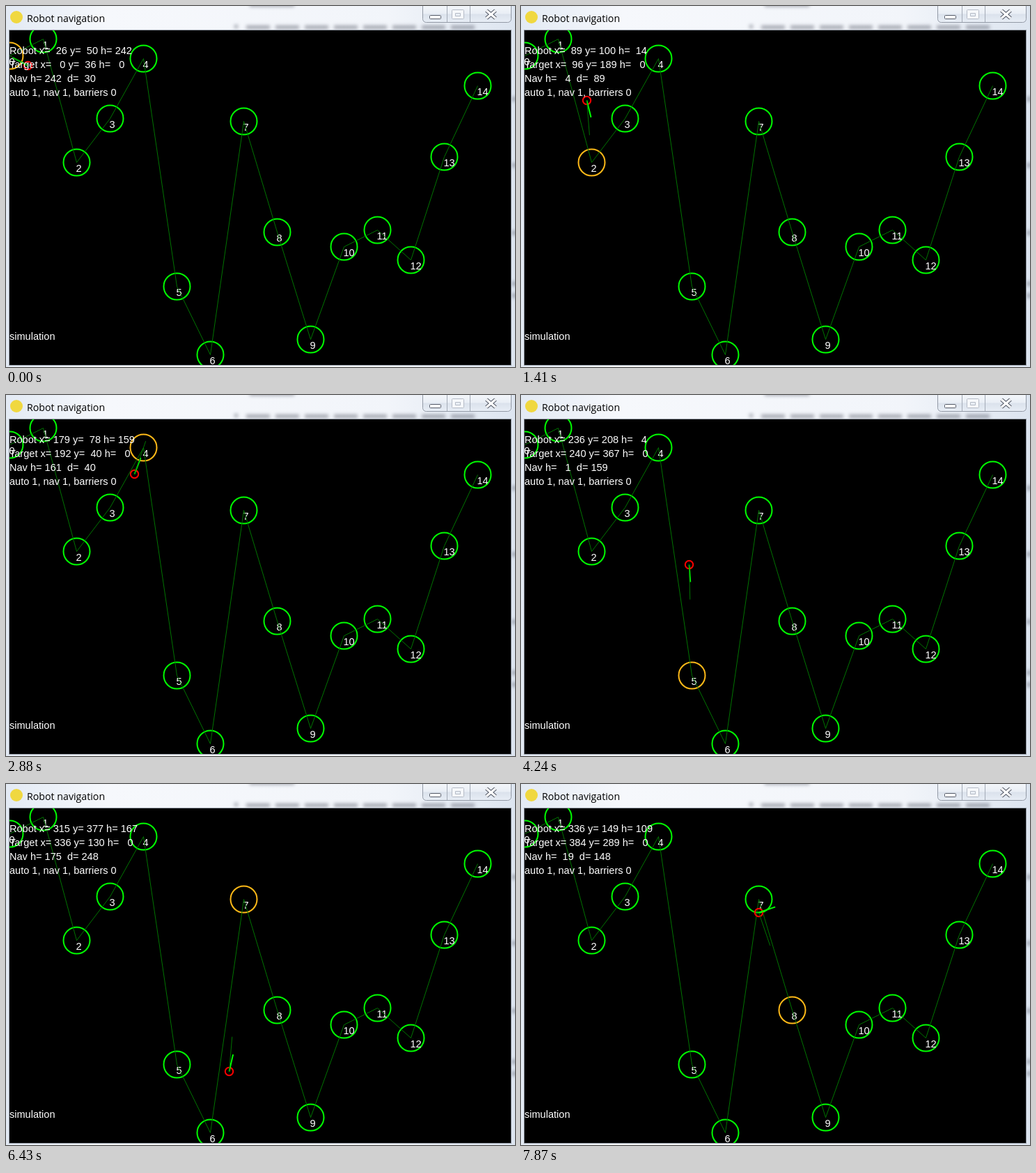
These frames come from a looping animation (731 by 518 pixels, 8 s). An HTML page with a canvas:

```html
<!DOCTYPE html>
<html lang="en">
<head>
<meta charset="utf-8">
<title>Robot navigation</title>
<style>
  html, body { margin: 0; width: 100%; height: 100%; overflow: hidden; background: #e6ecf5; }
  canvas { display: block; }
</style>
</head>
<body>
<canvas id="stage" width="731" height="518"></canvas>
<script>
const ctx = document.getElementById('stage').getContext('2d');
const LOOP = 8000;
const FIELD = { x: 5, y: 35, w: 720, h: 480 };
const GREEN = '#00ff00', DARK_GREEN = '#007400', ORANGE = '#ffba18', RED = '#ff0000';

// Waypoints are 48 units apart; only their heights vary.
const waypoints = [36, 12, 189, 126, 40, 367, 465, 130, 289, 443, 310, 286, 329, 181, 79]
  .map((y, i) => ({ x: i * 48, y }));

// Runs of evenly spaced steps: first time, last time, count.
const runs = [[0, 0, 1], [120, 1140, 8], [1260, 2280, 8], [2440, 3480, 8], [3640, 4660, 8],
  [4810, 5820, 8], [5970, 6880, 7], [7040, 7870, 7]];
const stepTimes = runs.flatMap(([from, to, n]) => Array.from({ length: n },
  (_, i) => Math.floor((from + (n > 1 ? (to - from) * i / (n - 1) : 0)) / 10) * 10));

// Known poses: step, x, y, heading, target.
const keyPoses = [[0, 26, 50, 242, 0], [10, 89, 100, 14, 2], [20, 179, 78, 159, 4],
  [29, 236, 208, 4, 5], [37, 257, 419, 24, 6], [44, 315, 377, 167, 7], [54, 336, 149, 109, 8]]
  .map(([step, x, y, h, target]) => ({ step, x, y, h, target }));

const rad = degrees => degrees * Math.PI / 180;
const turn = (from, to) => ((to - from + 540) % 360 + 360) % 360 - 180;
const wrap = degrees => (Math.round(degrees) % 360 + 360) % 360;

function navigate({ x, y, target }) {
  const dx = waypoints[target].x - x, dy = waypoints[target].y - y;
  return { h: Math.atan2(dx, dy) * 180 / Math.PI, d: Math.hypot(dx, dy) };
}

// Proportional steering; the robot slows down while it faces away from its target.
function drive(pose) {
  const SPEED = 26.8, GAIN = 0.5, REACHED = 20, SUBSTEPS = 20;
  const p = { ...pose };
  for (let i = 0; i < SUBSTEPS; i++) {
    if (navigate(p).d < REACHED) p.target++;
    const error = turn(p.h, navigate(p).h);
    const v = SPEED / SUBSTEPS * Math.max(0, Math.cos(rad(error)));
    p.x += v * Math.sin(rad(p.h));
    p.y += v * Math.cos(rad(p.h));
    p.h += GAIN / SUBSTEPS * error;
  }
  return p;
}

// Simulate between key poses and spread the remaining drift evenly.
const poses = [];
keyPoses.forEach((start, k) => {
  const end = keyPoses[k + 1];
  if (!end) return poses.push(start);
  const count = end.step - start.step, track = [start];
  for (let i = 0; i < count; i++) track.push(drive(track[i]));
  const last = track[count];
  for (let i = 0; i < count; i++) {
    const p = track[i], part = i / count;
    poses.push({
      x: p.x + (end.x - last.x) * part,
      y: p.y + (end.y - last.y) * part,
      h: p.h + turn(last.h, end.h) * part,
      target: Math.min(p.target, end.target)
    });
  }
});

function ring(x, y, r, color) {
  ctx.strokeStyle = color;
  ctx.lineWidth = 2;
  ctx.beginPath();
  ctx.arc(x, y, r, 0, Math.PI * 2);
  ctx.stroke();
}

function line(points, color, width) {
  ctx.strokeStyle = color;
  ctx.lineWidth = width;
  ctx.beginPath();
  points.forEach(([x, y]) => ctx.lineTo(x, y));
  ctx.stroke();
}

function ray(x, y, heading, length, color, width) {
  const a = rad(heading);
  line([[x, y], [x + length * Math.sin(a), y + length * Math.cos(a)]], color, width);
}

function text(s, x, y) {
  ctx.fillStyle = '#fff';
  ctx.font = '14.55px "Liberation Sans", sans-serif';
  ctx.fillText(s, x, y);
}

function box(x, y, w, h, fill, stroke, radii = 0) {
  ctx.beginPath();
  ctx.roundRect(x, y, w, h, radii);
  ctx.fillStyle = fill;
  ctx.fill();
  ctx.strokeStyle = stroke;
  ctx.lineWidth = 1;
  ctx.stroke();
}

function drawWindow() {
  const glass = ctx.createLinearGradient(0, 0, 731, 0);
  glass.addColorStop(0, '#e3eaf4');
  glass.addColorStop(0.2, '#f6f8fc');
  glass.addColorStop(0.75, '#f2f5fa');
  glass.addColorStop(1, '#dde5f0');
  ctx.fillStyle = glass;
  ctx.fillRect(0, 0, 731, 518);

  // Blurred page behind the glass frame
  ctx.save();
  ctx.filter = 'blur(2.5px)';
  ctx.fillStyle = 'rgba(60, 65, 80, 0.45)';
  ctx.fillRect(350, -3, 64, 4);
  ctx.fillRect(328, 27, 5, 5);
  for (let x = 345; x < 640; x += 42) ctx.fillRect(x, 28, 34, 5);
  for (const y of [130, 225, 322, 395, 412]) ctx.fillRect(727, y, 5, 7);
  ctx.restore();

  ctx.fillStyle = '#f0d840';
  ctx.beginPath();
  ctx.arc(15, 16, 9, 0, Math.PI * 2);
  ctx.fill();
  ctx.fillStyle = '#000';
  ctx.font = '14.2px "Open Sans", sans-serif';
  ctx.fillText('Robot navigation', 30, 23);

  const button = ctx.createLinearGradient(0, 0, 0, 24);
  button.addColorStop(0, '#f3f6fa');
  button.addColorStop(0.45, '#e9eef5');
  button.addColorStop(0.5, '#dbe2ec');
  button.addColorStop(1, '#e8eef6');
  box(598.5, -2.5, 127, 26, button, '#9299a5', [0, 0, 5, 5]);
  line([[633.5, 0], [633.5, 23]], '#a4abb7', 1);
  line([[666.5, 0], [666.5, 23]], '#a4abb7', 1);
  box(608.5, 13.5, 16, 5, '#fff', '#555b68', 1);
  box(640.5, 5.5, 17, 13, '#f6f8fb', '#b5bbc6', 1);
  box(645.5, 10.5, 7, 4, '#e9eef5', '#b5bbc6');
  for (const [color, width] of [['#555b68', 5.5], ['#fff', 3.2]]) {
    line([[690, 6.5], [703, 17.5]], color, width);
    line([[703, 6.5], [690, 17.5]], color, width);
  }
  box(4.5, 34.5, 721, 481, '#000', '#8e959f');
}

function drawField(pose) {
  const nav = navigate(pose);
  const target = waypoints[pose.target];
  const x = Math.round(pose.x), y = Math.round(pose.y);
  const pad = n => String(Math.round(n)).padStart(4);
  const place = (p, h) => `x=${pad(p.x)} y=${pad(p.y)} h=${pad(h)}`;

  ctx.save();
  ctx.beginPath();
  ctx.rect(FIELD.x, FIELD.y, FIELD.w, FIELD.h);
  ctx.clip();
  ctx.translate(FIELD.x, FIELD.y);

  waypoints.forEach((p, i) => {
    ring(p.x + 0.5, p.y + 0.5, 19, i === pose.target ? ORANGE : GREEN);
    text(i, p.x - 0.5, p.y + 14);
  });
  line(waypoints.map(p => [p.x + 0.5, p.y + 0.5]), DARK_GREEN, 1);

  ring(x + 0.5, y + 0.5, 5.7, RED);
  ray(x + 0.5, y + 0.5, pose.h, 25, GREEN, 2);
  ray(x + 0.5, y + 0.5, nav.h, 50, DARK_GREEN, 1);

  text(`Robot ${place(pose, wrap(pose.h))}`, 0, 34);
  text(`Target ${place(target, 0)}`, 0, 54);
  text(`Nav h=${pad(wrap(nav.h))}  d=${pad(nav.d)}`, 0, 74);
  text('auto 1, nav 1, barriers 0', 0, 94);
  text('simulation', 0, 444);
  ctx.restore();
}

const startTime = performance.now();
let shown = -1;

function tick() {
  const t = (performance.now() - startTime) % LOOP;
  const step = stepTimes.findLastIndex(time => time <= t);
  if (step !== shown) {
    shown = step;
    drawWindow();
    drawField(poses[step]);
  }
  requestAnimationFrame(tick);
}
tick();
</script>
</body>
</html>
```
